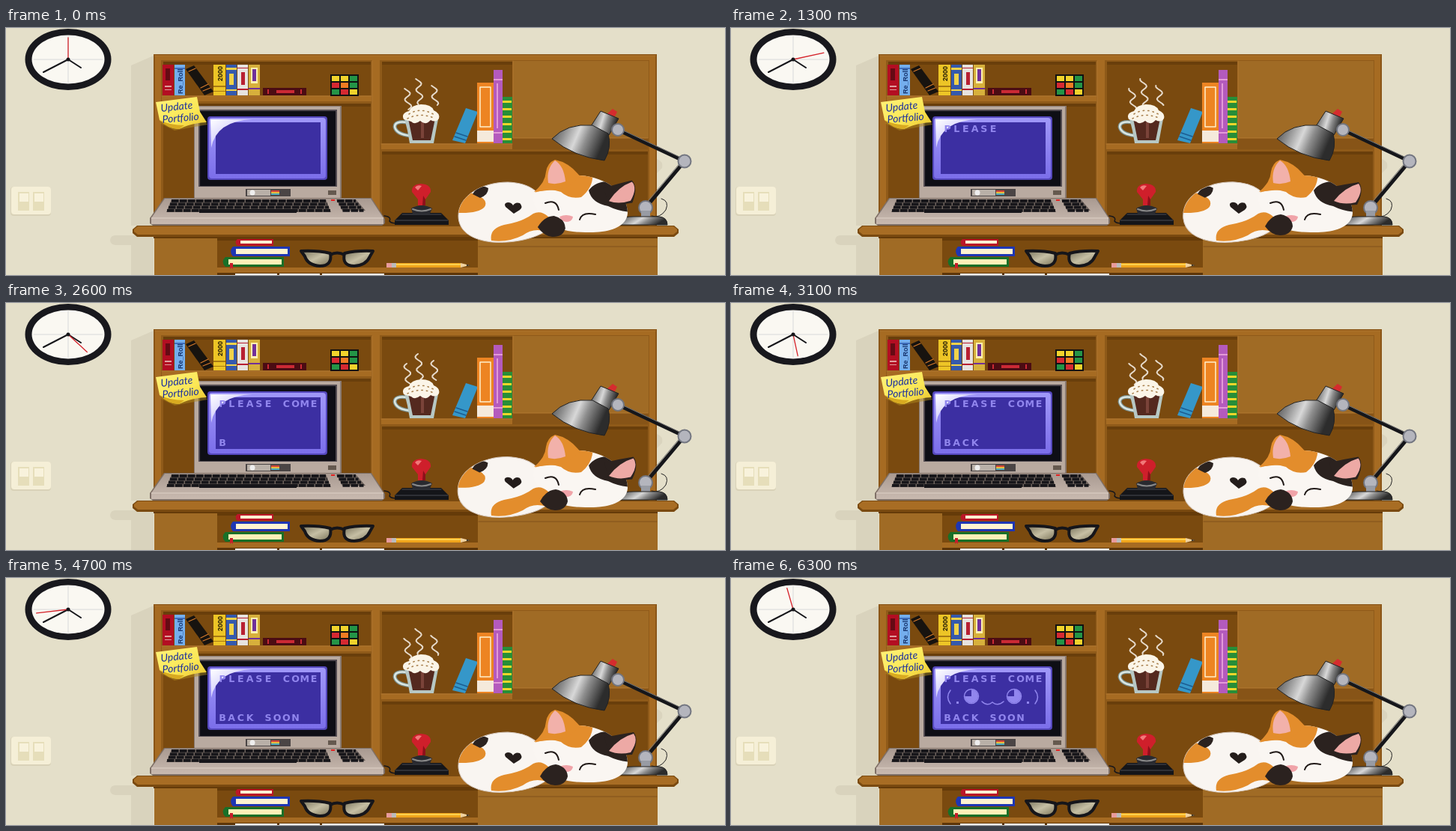
An HTML page that plays this animation: 960x330 px, repeating every 6.4 s.

```html
<!DOCTYPE html>
<html lang="en">
<head>
<meta charset="utf-8">
<title>Cat asleep on a desk</title>
<style>
html, body { margin: 0; width: 100%; height: 100%; overflow: hidden; background: #e4dfc9 }
svg { display: block; width: 960px; height: 330px }
.line { fill: none; stroke-linecap: round; stroke-linejoin: round }
.dashes { fill: none; stroke-linecap: butt }
#typed text { font: bold 12.6px 'DejaVu Sans', sans-serif; text-anchor: middle; fill: #9186ee; white-space: pre }
.note { font: italic 14px Lato, sans-serif; fill: #1a2fa0 }
.spine { font: bold 9px 'Liberation Sans', sans-serif }
</style>
</head>
<body>
<svg viewBox="0 0 960 330">
<defs>
  <linearGradient id="steel" gradientTransform="rotate(15)">
    <stop stop-color="#4a4a4a"/><stop offset=".25" stop-color="#8c8c8c"/><stop offset=".5" stop-color="#d8d8d8"/>
    <stop offset=".68" stop-color="#8e8e8e"/><stop offset="1" stop-color="#2c2c2c"/>
  </linearGradient>
  <linearGradient id="glow" x2="0" y2="1"><stop stop-color="#a098f8"/><stop offset="1" stop-color="#7b6eea"/></linearGradient>
  <linearGradient id="sheen" x2=".8" y2=".8"><stop stop-color="#fff"/><stop offset="1" stop-color="#b9b2fa"/></linearGradient>
  <linearGradient id="shell" x2="0" y2="1"><stop stop-color="#a99a91"/><stop offset="1" stop-color="#c9bab0"/></linearGradient>
  <linearGradient id="lens" x2="1" y2="1"><stop stop-color="#77715a"/><stop offset=".5" stop-color="#c6bfa4"/><stop offset="1" stop-color="#777055"/></linearGradient>
  <linearGradient id="paper" x2="1" y2="1"><stop stop-color="#fff27a"/><stop offset=".6" stop-color="#fbe755"/><stop offset="1" stop-color="#e6bf28"/></linearGradient>
  <clipPath id="headClip"><path d="M704 226C712 202 740 195 766 197C803 199 830 222 830 247C829 267 803 274 774 273C740 273 708 262 704 226Z"/></clipPath>
  <clipPath id="bodyClip"><path id="bodyShape" d="M604 251C604 224 636 206 670 206C699 207 716 219 722 243L726 267C710 282 675 288 649 286C621 283 604 271 604 251Z"/></clipPath>
</defs>

<!-- wall -->
<path fill="#d9d3bd" d="M167 50L197 37V264H167Z"/>
<path fill="#d9d3bd" d="M146 277H197V330H167V290H146Q139 289 139 283Q140 277 146 277Z"/>
<path fill="#dad4be" d="M869 175Q878 178 876 187L869 194Z"/>
<rect x="6" y="212" width="54" height="39" rx="4" fill="#d9d2b8"/>
<rect x="7" y="212" width="53" height="37" rx="4" fill="#f5efd7"/>
<path fill="#e6deba" d="M16 219H31V244H16ZM36 219H51V244H36Z"/>
<path fill="#f8f2dc" d="M18 221H30V232H18ZM38 221H50V232H38Z"/>

<!-- clock -->
<ellipse cx="83" cy="42" rx="57.5" ry="41" fill="#18181d"/>
<ellipse cx="83" cy="42" rx="48.5" ry="32.5" fill="#faf8f2"/>
<path class="line" stroke="#d8d9da" d="M83 11V73M37 42H129"/>
<path class="line" stroke="#16161a" stroke-width="2" d="M100 53L83 42L50 59"/>
<path class="line" stroke="#d5242c" stroke-width="1.3" id="second"/>
<circle cx="83" cy="42" r="2.5" fill="#16161a"/>

<!-- desk -->
<path fill="#8a5517" d="M197 35H869V264H197Z"/>
<path fill="#a66b22" d="M199 37H867V264H199Z"/>
<path fill="#8f5a19" d="M207 43H859V264H207Z"/>
<path fill="#7a4a0f" d="M210 45H487V90H210ZM210 101H487V264H210ZM502 45H676V154H502ZM502 165H857V264H502Z"/>
<path fill="#693e0b" d="M210 45H487V49H210ZM210 101H487V105H210ZM502 45H676V49H502ZM502 165H857V169H502Z"/>
<path fill="#a66b22" d="M489 43H499V264H489ZM208 91H488V98H208ZM501 155H857V162H501Z"/>
<path fill="#875417" d="M676 147H857V162H676Z"/>
<path fill="#a06b25" d="M677 44H858V147H677Z"/>
<path class="line" stroke="#b27931" d="M208 91H488M501 155H676M489 44V264M199 37H867M677 44V147H857"/>
<path fill="#7a4a10" d="M175 264H892L898 269V274L892 279H175L169 274V269Z"/>
<path fill="#a86d24" d="M176 265H891L896 269V272L891 276H176L171 272V269Z"/>
<path fill="#a06b25" d="M198 280H282V330H198ZM630 280H870V330H630Z"/>
<path fill="#7a4a0f" d="M282 280H630V320H282Z"/>
<path fill="#653b09" d="M282 280H630V284H282ZM197 279H870V281H197Z"/>
<path fill="#a66b22" d="M282 320H630V327H282Z"/>
<path fill="#5d3508" d="M282 327H630V330H282Z"/>
<path fill="#f4f1e8" d="M306 328H362V330H306ZM365 328H419V330H365ZM422 328H505V330H422Z"/>
<path class="line" stroke="#80501a" d="M631 292H869"/>

<!-- top shelf -->
<path fill="#b30e22" d="M209 49H224V90H209Z"/>
<path fill="#e0a0a0" d="M212 77H221V79H212ZM212 82H221V83H212Z"/>
<path fill="#650a14" d="M213 54H219V70H213Z"/>
<path fill="#74aeed" d="M225 49H239V90H225Z"/>
<path fill="#3e6dbb" d="M225 53H239V55H225Z"/>
<text class="spine" fill="#17356f" transform="translate(235.5 88) rotate(-90)">Re_Roll</text>
<path fill="#17130f" d="M240 55L251 50L277 85L265 90Z"/>
<path class="line" stroke="#d3782b" stroke-width="1.3" d="M244 58L253 54M260 80L270 75M263 84L273 80"/>
<path fill="#edc526" d="M277 49H293V90H277Z"/>
<path fill="#a77a13" d="M277 77H293V79H277ZM277 84H293V85H277Z"/>
<text class="spine" fill="#241c07" transform="translate(288.5 71) rotate(-90)">2000</text>
<path fill="#3559ad" d="M294 49H308V90H294Z"/>
<path fill="#f0d24a" d="M294 53H308V56H294ZM298 61H304V76H298ZM294 82H308V84H294Z"/>
<path fill="#e7e3df" d="M309 49H323V90H309Z"/>
<path fill="#b81f32" d="M309 53H323V54H309ZM314 59H319V76H314ZM309 81H323V83H309Z"/>
<path fill="#d7b03c" d="M324 49H339V90H324Z"/>
<path fill="#fff0b0" d="M327 53H336V74H327Z"/>
<path fill="#71309a" d="M329 55H334V71H329ZM324 80H339V82H324Z"/>
<path fill="#4b0c13" d="M343 80H401V90H343Z"/>
<path fill="#cb2935" d="M349 82H351V88H349ZM361 83H385V87H361ZM393 82H395V88H393Z"/>
<path fill="#111" d="M433 62H471V91H433Z"/>
<g id="cube"></g>

<!-- computer -->
<path fill="#89796f" d="M251 104H448V228H251Z"/>
<path fill="#b9aaa0" d="M252 105H446V227H252Z"/>
<path fill="#514a50" d="M257 109H442V212H257Z"/>
<path fill="#0e0e15" d="M259 111H440V211H259Z"/>
<rect x="269" y="118" width="160" height="85" rx="4" fill="#5548bd"/>
<rect x="271" y="120" width="156" height="81" rx="4" fill="url(#glow)"/>
<path fill="#3c2fa2" d="M280 126H420V195H280Z"/>
<path fill="url(#sheen)" d="M273 122H329Q281 124 274 160Z"/>
<g id="typed"><text y="138.5"></text><text y="190.5"></text></g>
<rect id="cursor" x="405" y="181" width="10" height="10" fill="#9186ee"/>
<g id="face">
  <path class="line" stroke="#9186ee" stroke-width="1.5" d="M293 150Q286 159 293 168M406 150Q413 159 406 168M335 165Q342 172 349 166M349 166Q356 172 364 165"/>
  <circle cx="321" cy="158" r="9.5" fill="none" stroke="#9186ee" stroke-width="1.5"/>
  <circle cx="378" cy="158" r="9.5" fill="none" stroke="#9186ee" stroke-width="1.5"/>
  <path fill="#9186ee" d="M321 158V149A9 9 0 1 1 312 158ZM378 158V149A9 9 0 1 1 369 158ZM301 165H304V168H301ZM395 165H398V168H395Z"/>
</g>
<path fill="#4b4545" d="M320 215H380V225H320Z"/>
<path fill="#b9b0a8" d="M322 216H353V224H322Z"/>
<circle cx="329" cy="220" r="3.5" fill="#eee"/>
<path fill="#d84638" d="M354 217H365V219H354Z"/><path fill="#e6bd3f" d="M354 219H365V221H354Z"/><path fill="#4da9bb" d="M354 221H365V223H354Z"/>
<path fill="#65594f" d="M430 217H441V223H430Z"/>
<path fill="#7f7067" d="M211 227H488L506 255V261L502 264H196L192 261V254Z"/>
<path fill="url(#shell)" d="M212 228H487L504 254V262H194V254Z"/>
<path fill="#d0c2b8" d="M194 253H504V255H194Z"/>
<path fill="#6d625c" d="M221 229H427L434 246H214ZM441 229H467L480 244H449Z"/>
<path id="keys" class="dashes" stroke="#17161a" stroke-width="3.8" stroke-dasharray="9.5 1.5"/>
<path fill="#17161a" d="M258 242H388V247H258Z"/>
<path fill="#e32323" d="M434 229H439V231H434Z"/>

<!-- note -->
<path fill="#b08a1e" opacity=".5" d="M205 127L225 137L269 129L260 118Z"/>
<path fill="url(#paper)" d="M200 99L255 92L259 112L268 126Q247 127 231 135Q218 135 205 123Z"/>
<path fill="#d8aa20" d="M205 123Q219 130 238 130L231 135Q216 135 205 123Z"/>
<text class="note" transform="translate(207 112) rotate(-6)">Update</text>
<text class="note" transform="translate(209 127) rotate(-5)">Portfolio</text>

<!-- mug and books -->
<path id="steam" class="line" stroke="#e6dacb" stroke-width="2"/>
<path class="line" stroke="#7d918e" stroke-width="5" d="M535 126Q519 124 519 132Q521 142 540 144"/>
<path class="line" stroke="#dbe7e2" stroke-width="2.5" d="M535 126Q519 124 519 132Q521 142 540 144"/>
<path fill="#b7c8c4" d="M531 117H578L575 132L571 154H539L536 137Z"/>
<path fill="#54291f" d="M537 121H573L567 150H543Z"/>
<path fill="#7a4339" d="M554 126H558V147H554Z"/>
<path fill="#fbf5e8" d="M531 122Q527 114 538 111Q541 103 554 102Q568 102 571 110Q580 114 578 121Q574 127 567 123Q560 131 553 124Q546 130 541 125Z"/>
<path class="line" stroke="#a77f4c" stroke-width="1.5" stroke-dasharray="1.5 5" d="M538 115Q554 105 572 116M536 121Q554 112 573 121"/>
<path fill="#3597c9" d="M614 107L630 112L613 154L596 150Z"/>
<path class="line" stroke="#1c5c92" stroke-width="1.5" d="M601 140L616 145M599 145L614 150"/>
<path fill="#ed8422" d="M629 73H651V154H629Z"/>
<path class="line" stroke="#fff0cb" stroke-width="1.5" d="M633 79H647V132H633Z"/>
<path fill="#f5eadb" d="M629 137H651V152H629Z"/>
<path fill="#b45abd" d="M651 56H663V154H651Z"/>
<path fill="#e49ad8" d="M651 68H663V70H651ZM651 139H663V141H651ZM655 74H657V134H655Z"/>
<path fill="#278e38" d="M663 92H676V154H663Z"/>
<path class="dashes" stroke="#f0d62b" stroke-width="12" stroke-dasharray="3 7" d="M669 97V152"/>

<!-- joystick -->
<path class="line" stroke="#17171b" stroke-width="1.5" d="M505 251Q515 252 512 258Q515 262 523 260"/>
<path fill="#141519" d="M529 247H581L591 257V263H519V257Z"/>
<path class="line" stroke="#494b52" d="M529 249H581M520 257H590"/>
<path fill="#292a30" d="M541 241Q555 233 569 241L566 248H543Z"/>
<path class="line" stroke="#888" stroke-width="2" d="M543 242Q555 247 567 242"/>
<path fill="#cf1f2b" d="M550 229L542 219Q541 209 554 208Q568 209 567 219L560 229V237H550Z"/>
<path fill="#f17879" d="M546 213Q549 209 555 211L550 217Z"/>
<path fill="#8e101a" d="M557 224L560 229V237H556Z"/>

<!-- lamp -->
<path class="line" stroke="#222" d="M862 251Q873 255 881 243Q886 231 875 228"/>
<path class="line" stroke="#15161a" stroke-width="5" d="M817 136L906 178L854 240"/>
<path class="line" stroke="#777" d="M820 135L903 174M901 179L854 235"/>
<path fill="#d52c2e" d="M801 116L810 108L816 112L812 120Z"/>
<path fill="url(#steel)" stroke="#222" d="M794 111L818 121L805 143L781 131Z"/>
<path fill="url(#steel)" stroke="#222" d="M729 148Q749 127 783 130L804 141Q809 160 799 177Q758 172 729 148Z"/>
<g fill="#b4b5bd" stroke="#737680" stroke-width="2">
  <circle cx="817" cy="136" r="8"/><circle cx="906" cy="178" r="8.5"/><circle cx="854" cy="240" r="9"/>
</g>
<path fill="#989ba3" d="M848 244H860V254H848Z"/>
<path fill="url(#steel)" stroke="#222" d="M822 255Q826 252 838 252H872Q883 253 883 263H820Z"/>

<!-- lower shelf -->
<path fill="#bb1727" d="M309 282H357V291H309Q304 286 309 282Z"/>
<path fill="#fff4d1" d="M313 284H355V288H313Z"/>
<path fill="#1e36b4" d="M303 292H379V305H303Q297 298 303 292Z"/>
<path fill="#fff4d1" d="M307 295H376V302H307Z"/>
<path fill="#187028" d="M293 306H371V319H293Q286 312 293 306Z"/>
<path fill="#fff0b8" d="M297 309H368V316H297Z"/>
<path fill="#c71d2b" d="M299 314H303V322L301 320L299 322Z"/>
<g fill="url(#lens)" stroke="#15151a" stroke-width="4" stroke-linejoin="round">
  <path d="M394 298Q416 297 433 301Q436 318 419 318Q403 317 399 305Z"/>
  <path d="M490 298Q468 297 452 301Q448 318 465 318Q481 317 486 305Z"/>
  <path fill="none" d="M433 303Q442 298 452 303"/>
</g>
<path fill="#e99b9c" d="M508 314H515V320H508Z"/><path fill="#bbb" d="M515 314H521V320H515Z"/>
<path fill="#efa41c" d="M521 314H607V320H521Z"/><path fill="#ffd04d" d="M521 315H607V317H521Z"/>
<path fill="#f1d2a0" d="M607 314L619 317L607 320Z"/><path fill="#222" d="M615 316L620 317L615 318Z"/>

<!-- cat -->
<g id="body">
  <use href="#bodyShape" fill="#f9f5f1" stroke="#d6c9bf"/>
  <g clip-path="url(#bodyClip)">
    <path fill="#e38d2c" d="M602 235Q612 216 626 222Q645 229 639 239Q631 248 603 247Z"/>
    <path fill="#2b221f" d="M623 222Q632 207 644 214Q644 223 633 227Z"/>
  </g>
  <path fill="#241d1b" d="M678 248L667 239Q664 234 670 233Q675 233 677 237Q680 232 686 234Q691 239 686 243Z"/>
</g>
<g clip-path="url(#headClip)">
  <path fill="#faf6f2" d="M700 190H835V280H700Z"/>
  <path fill="#e38d2c" d="M700 222V190H783Q786 212 768 226Q752 229 741 219Q722 213 700 222Z"/>
  <path fill="#2b221f" d="M778 217Q788 203 812 205L835 222V246Q818 245 804 238Q782 234 778 217Z"/>
</g>
<path fill="#e38d2c" d="M705 219Q720 207 721 192Q723 180 733 176Q753 180 767 199L748 214Z"/>
<path fill="#f2b1aa" d="M724 207Q721 188 733 177Q745 184 747 205Q735 210 724 207Z"/>
<g id="ear">
  <path fill="#2b221f" d="M799 213Q818 209 838 206Q846 216 836 236L806 238Z"/>
  <path fill="#eda9a5" d="M805 231Q819 213 838 208Q845 217 834 233Q818 237 805 231Z"/>
</g>
<path class="line" stroke="#211a18" stroke-width="2" d="M720 234Q735 228 738 243M766 256Q769 245 787 249"/>
<path fill="#f0a3a8" d="M739 252Q748 248 757 252Q756 259 748 259Q741 258 739 252Z"/>
<path fill="#e38d2c" d="M648 284Q645 268 665 263Q690 259 704 248Q714 243 724 252L722 272Q704 266 690 277Q670 287 648 284Z"/>
<path id="tail" fill="#2b221f" d="M713 265Q721 250 734 249Q749 252 750 265Q747 277 733 277Q722 277 713 265Z"/>
</svg>

<script>
const LOOP = 6400, STEP = 100, CYCLE = 1600, TAU = Math.PI * 2;
const $ = id => document.getElementById(id);
const words = ['PLEASE COME', 'BACK SOON'];
const rows = document.querySelectorAll('#typed text');

rows.forEach(row => row.setAttribute('x', Array.from({length: 11}, (_, i) => 289 + i * 12.2).join(' ')));

const stickers = ['#f1d32c', '#f1d32c', '#239447', '#d62932', '#ee7c22', '#239447', '#239447', '#d62932', '#f1d32c'];
$('cube').innerHTML = stickers.map((color, i) =>
  `<rect x="${435 + i % 3 * 12}" y="${64 + Math.floor(i / 3) * 9}" width="10" height="7" fill="${color}"/>`).join('');

let keys = '';
for (let r = 0; r < 4; r++) {
  const y = 231 + r * 4.3;
  keys += `M${221 - r * 2} ${y}H${427 + r * 2}M${442 + r * 2.5} ${y}H${467 + r * 3.5}`;
}
$('keys').setAttribute('d', keys);

// Wavy wisp whose bends travel upwards
function wisp(x, top, bottom, phase) {
  const points = [];
  for (let y = top; y <= bottom; y += 2) {
    points.push(`${x + (y - top) * .1 - 4 * Math.cos(TAU * ((y - top) / 17 + phase))} ${y}`);
  }
  return 'M' + points.join('L');
}

const show = (id, visible) => $(id).style.display = visible ? '' : 'none';

function draw(t) {
  const angle = TAU * t / 6500;
  $('second').setAttribute('d', `M83 42L${83 + 43 * Math.sin(angle)} ${42 - 29 * Math.cos(angle)}`);

  const count = Math.max(0, Math.floor((t - 100) / 200));
  rows[0].textContent = words[0].slice(0, count);
  rows[1].textContent = words[1].slice(0, Math.max(0, count - words[0].length));
  show('face', t >= 5000);
  show('cursor', t >= 4400 && t % 400 < 200);

  const phase = (t + 200) / CYCLE;
  $('steam').setAttribute('d', wisp(535, 81, 110, phase) + wisp(550, 68, 102, phase) + wisp(571, 77, 104, phase));

  // The tail tip dips for one second of each cycle, then rests
  const wag = Math.sin(Math.PI * Math.min(1, (t + 100) % CYCLE / 1000));
  $('tail').setAttribute('transform', `translate(${-10 * wag} ${6 * wag}) rotate(${8 * wag} 730 264)`);

  const sinceTwitch = (t + 300) % 2850 - 300;
  const twitch = Math.max(0, 1 - Math.abs(sinceTwitch) / 300);
  $('ear').setAttribute('transform', `rotate(${-5 * twitch} 808 232)`);

  const breath = .004 * (1 - Math.cos(TAU * t / CYCLE));
  $('body').setAttribute('transform', `translate(722 287) scale(${1 + breath}) translate(-722 -287)`);
}

function tick() {
  draw(Math.floor(performance.now() % LOOP / STEP) * STEP);
  requestAnimationFrame(tick);
}
tick();
</script>
</body>
</html>
```
